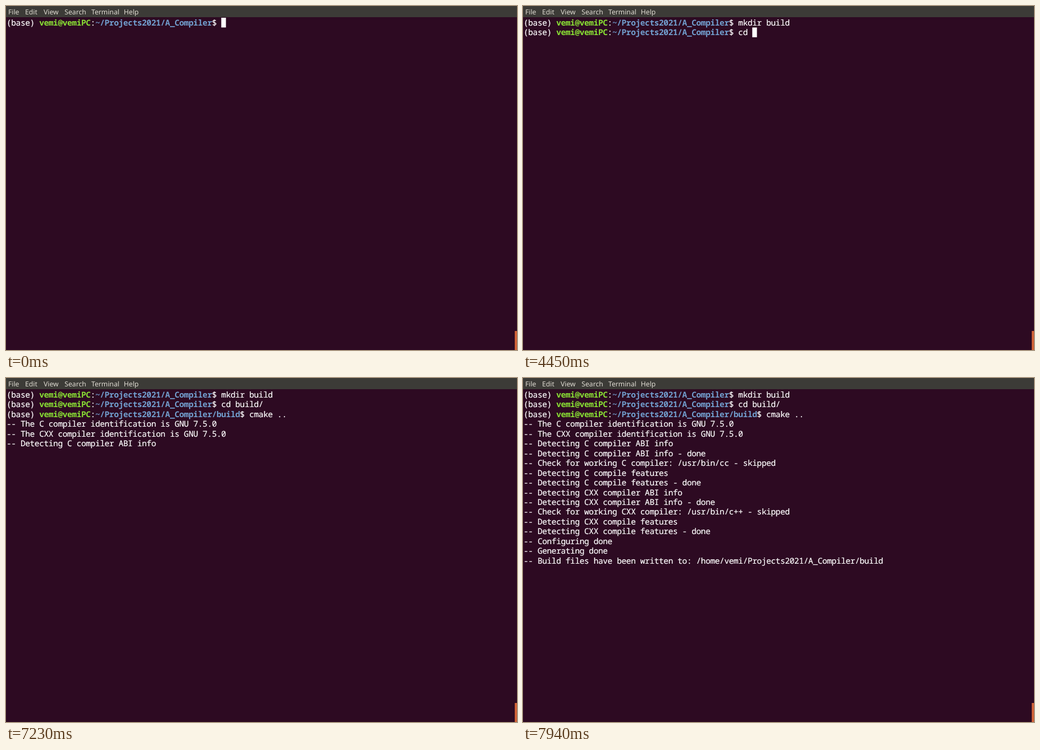
An HTML page that plays this animation: 910 by 615 pixels, repeating every 8000 ms.

```html
<!DOCTYPE html>
<html lang="en">
<head>
<meta charset="utf-8">
<title>Terminal</title>
<style>
  html, body { margin: 0; width: 100%; height: 100%; overflow: hidden; background: #2d0a22; }
  svg { display: block; width: 910px; height: 615px; }
  text { white-space: pre; text-rendering: geometricPrecision; }
  .menu { font: 12.2px "Noto Sans", "Open Sans", sans-serif; fill: #dfdbd2; }
  .shell { font: 14.5px "Noto Sans Mono", "DejaVu Sans Mono", monospace; letter-spacing: -0.388px; }
  .plain { fill: #fff; stroke: #fff; stroke-width: 0.2px; }
  .user, .path { font-weight: 700; }
  .user { fill: #8ae234; }
  .path { fill: #729fcf; }
</style>
</head>
<body>
<svg viewBox="0 0 910 615">
  <rect width="910" height="615" fill="#2d0a22"/>
  <rect width="910" height="20" fill="#3c3b37"/>
  <g class="menu">
    <text x="4" y="15">File</text>
    <text x="34" y="15">Edit</text>
    <text x="67" y="15">View</text>
    <text x="104.3" y="15">Search</text>
    <text x="152" y="15">Terminal</text>
    <text x="209.8" y="15">Help</text>
  </g>
  <rect x="906" y="581" width="4" height="34" fill="#cf6238"/>
  <g class="shell" id="shell"></g>
  <rect id="cursor" width="8.3" height="17.4" fill="#fff"/>
</svg>
<script>
const LOOP = 8000, CELL_W = 8.312, CELL_H = 17.45;
const USER = 'vemi';
const ROOT = 'Projects2021/A_Compiler';

const shell = document.getElementById('shell');
const cursor = document.getElementById('cursor');
const cellX = col => 1 + col * CELL_W;

// Every piece of text has a start time and leaves the cursor at row, col.
const pieces = [];
let row = 0, col = 0;

function put(start, text, kind = 'plain') {
  const node = document.createElementNS('http://www.w3.org/2000/svg', 'text');
  node.setAttribute('class', kind);
  node.setAttribute('x', cellX(col));
  node.setAttribute('y', Math.round(35 + row * CELL_H));
  node.textContent = text;
  shell.append(node);
  col += text.length;
  pieces.push({ start, node, row, col });
}

function newline(start) {
  row++;
  col = 0;
  put(start, '');
}

function prompt(start, dir) {
  put(start, '(base) ');
  put(start, `${USER}@${USER}PC`, 'user');
  put(start, ':');
  put(start, `~/${dir}`, 'path');
  put(start, '$ ');
}

function type(start, pace, text) {
  [...text].forEach((char, i) => put(start + i * pace, char));
}

function print(start, pace, lines) {
  lines.forEach((line, i) => {
    put(start + i * pace, `-- ${line}`);
    newline(start + i * pace);
  });
}

const probe = (lang, bin) => [
  `Detecting ${lang} compiler ABI info`,
  `Detecting ${lang} compiler ABI info - done`,
  `Check for working ${lang} compiler: /usr/bin/${bin} - skipped`,
  `Detecting ${lang} compile features`,
  `Detecting ${lang} compile features - done`
];
const [cxxStart, ...cxxRest] = probe('CXX', 'c++');

prompt(0, ROOT);
type(1440, 160, 'mkdir ');
type(2450, 200, 'build');

newline(3580);
prompt(3580, ROOT);
type(4090, 180, 'cd b');
type(4850, 0, 'uild/');

newline(5100);
prompt(5600, `${ROOT}/build`);
type(5600, 135, 'cmake');
type(6330, 170, ' ..');

newline(7040);
print(7040, 70, [
  'The C compiler identification is GNU 7.5.0',
  'The CXX compiler identification is GNU 7.5.0',
  ...probe('C', 'cc'),
  cxxStart
]);
print(7580, 60, [
  ...cxxRest,
  'Configuring done',
  'Generating done',
  `Build files have been written to: /home/${USER}/${ROOT}/build`
]);

const cursorLit = t => t < 2450 || (t >= 4310 && t < 5850) || (t >= 7350 && t < 7770);

function tick() {
  const time = performance.now() % LOOP;
  for (const { start, node } of pieces) {
    node.style.display = start <= time ? '' : 'none';
  }
  const last = pieces.findLast(({ start }) => start <= time);
  cursor.setAttribute('x', cellX(last.col));
  cursor.setAttribute('y', 21 + last.row * CELL_H);
  cursor.style.display = cursorLit(time) ? '' : 'none';
  requestAnimationFrame(tick);
}
tick();
</script>
</body>
</html>
```
